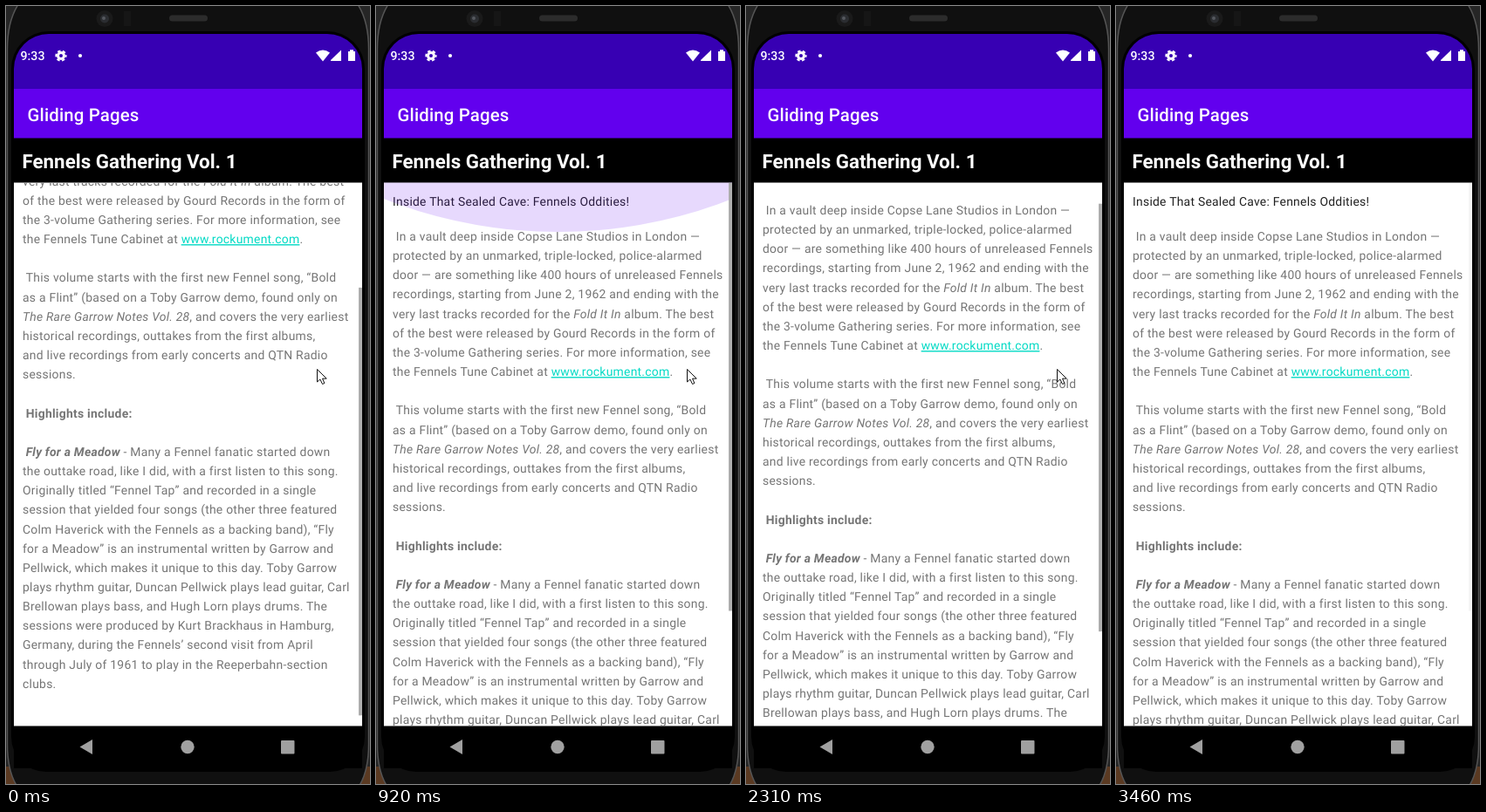
Recreate the animation shown at these times as an HTML page. Size 417 by 892 pixels, loop 4320 ms.

```html
<!DOCTYPE html>
<html lang="en">
<head>
<meta charset="utf-8">
<title>Gliding Pages</title>
<style>
  html, body { margin: 0; width: 100%; height: 100%; overflow: hidden; background: #262626; }
  svg { display: block; width: 417px; height: 892px; }
  text { font-family: Roboto, sans-serif; text-rendering: geometricPrecision; white-space: pre; }
  #page text { font-size: 13.92px; letter-spacing: .0179em; fill: #757575; }
  #page .lead { fill: #212121; }
  .i { font-style: italic; }
  .b { font-weight: 700; }
  .link { fill: #03dac5; text-decoration: underline; }
</style>
</head>
<body>
<svg viewBox="0 0 417 892">
  <defs>
    <clipPath id="screen"><path d="M9 874V72A40 40 0 0 1 49 32H368A40 40 0 0 1 408 72V874Z"/></clipPath>
    <clipPath id="view"><rect x="9" y="202.500" width="399" height="623"/></clipPath>
  </defs>

  <!-- phone body -->
  <rect width="417" height="892" fill="#262626"/>
  <path d="M0 872h14v20H0zM403 872h14v20h-14z" fill="#5b3a22"/>
  <path d="M1.500 50Q1.500 14 17 -6H400Q415.500 14 415.500 50V846Q415.500 880 402 898H15Q1.500 880 1.500 846Z" fill="#101010" stroke="#555" stroke-width="1.500"/>
  <path d="M6 72A43 43 0 0 1 49 29H368A43 43 0 0 1 411 72V838A40 40 0 0 1 371 878H46A40 40 0 0 1 6 838Z"/>
  <circle cx="113" cy="14.500" r="9.500" fill="#1a1a1a"/>
  <circle cx="113" cy="14.500" r="5" fill="#2b2d31"/>
  <circle cx="112" cy="14" r="2" fill="#55585e"/>
  <path d="M135 6h8v17h-8z" fill="#161616"/>
  <rect x="187" y="10.500" width="44" height="7" rx="3.500" fill="#2c2c2c"/>

  <!-- bars -->
  <g clip-path="url(#screen)">
    <rect x="9" y="32" width="399" height="842"/>
    <rect x="9" y="32" width="399" height="63.500" fill="#3700b3"/>
    <rect x="9" y="95" width="399" height="56.500" fill="#6200ee"/>
    <rect x="9" y="202.500" width="399" height="623" fill="#fff"/>
  </g>
  <g fill="#fff">
    <text x="16.500" y="62" font-size="14.200" font-weight="500">9:33</text>
    <circle cx="63" cy="57" r="3.500" fill="none" stroke="#fff" stroke-width="3"/>
    <circle cx="63" cy="57" r="5.600" fill="none" stroke="#fff" stroke-width="2" stroke-dasharray="3.400 2.464" stroke-dashoffset="1.700"/>
    <circle cx="85" cy="57" r="2.100"/>
    <path d="M363 63.500L355 53.500Q363 47.500 371 53.500Z"/>
    <path d="M372 63V62L384 50.500V63Z"/>
    <path d="M392 52h2v-1.800h4V52h2v11h-8z"/>
    <text x="24.500" y="132" font-size="20.400" font-weight="500" letter-spacing=".15">Gliding Pages</text>
    <text x="18.500" y="186" font-size="22.350" font-weight="700">Fennels Gathering Vol. 1</text>
  </g>
  <g fill="#a0a0a0">
    <path d="M84.500 849.500L99 841V858Z"/>
    <circle cx="208" cy="849.500" r="7.700"/>
    <rect x="315" y="842" width="15.500" height="15.500" rx="1"/>
  </g>

  <!-- scrolling view -->
  <g clip-path="url(#view)">
    <g id="page"></g>
    <ellipse id="glow" cx="208.500" rx="479" fill="#6200ee"/>
    <rect id="bar" x="404" width="4" height="490.500" fill="#adadad"/>
  </g>
  <path id="cursor" d="M0 0V14.500L3.400 11.500L6 17L8.400 16L6 10.700H10.700Z" fill="#fff" stroke="#111" stroke-width="1"/>
</svg>
<script>
const LOOP = 4320, TOP = 203, VIEW = 622, BAR = 490.5;
const $ = id => document.getElementById(id);
const span = (cls, s) => `<tspan class="${cls}">${s}</tspan>`;

// a leading space marks an indented line
const lines = [
  ' In a vault deep inside Copse Lane Studios in London —',
  'protected by an unmarked, triple-locked, police-alarmed',
  'door — are something like 400 hours of unreleased Fennels',
  'recordings, starting from June 2, 1962 and ending with the',
  `very last tracks recorded for the ${span('i', 'Fold It In')} album. The best`,
  'of the best were released by Gourd Records in the form of',
  'the 3-volume Gathering series. For more information, see',
  `the Fennels Tune Cabinet at ${span('link', 'www.rockument.com')}.`,
  '',
  ' This volume starts with the first new Fennel song, “Bold',
  'as a Flint” (based on a Toby Garrow demo, found only on',
  `${span('i', 'The Rare Garrow Notes Vol. 28')}, and covers the very earliest`,
  'historical recordings, outtakes from the first albums,',
  'and live recordings from early concerts and QTN Radio',
  'sessions.',
  '',
  ' ' + span('b', 'Highlights include:'),
  '',
  ` ${span('b i', 'Fly for a Meadow')} - Many a Fennel fanatic started down`,
  'the outtake road, like I did, with a first listen to this song.',
  'Originally titled “Fennel Tap” and recorded in a single',
  'session that yielded four songs (the other three featured',
  'Colm Haverick with the Fennels as a backing band), “Fly',
  'for a Meadow” is an instrumental written by Garrow and',
  'Pellwick, which makes it unique to this day. Toby Garrow',
  'plays rhythm guitar, Duncan Pellwick plays lead guitar, Carl',
  'Brellowan plays bass, and Hugh Lorn plays drums. The',
  'sessions were produced by Kurt Brackhaus in Hamburg,',
  'Germany, during the Fennels’ second visit from April',
  'through July of 1961 to play in the Reeperbahn-section',
  'clubs.'
];

const row = (s, y, cls = '') =>
  `<text class="${cls}" x="${s[0] === ' ' ? 22.7 : 19}" y="${y}">${s.trim()}</text>`;
$('page').innerHTML = row('Inside That Sealed Cave: Fennels Oddities!', 228.5, 'lead') +
  lines.map((s, i) => row(s, 269 + i * 22.16)).join('');

// stepped tracks: [start ms, value]
const scroll = [[0, 152], [150, 138], [550, 107], [800, 40], [920, 0],
  [2060, 15], [2310, 30], [2740, 45], [2860, 20], [2980, 0]];
const depth = [[0, 0], [920, 56], [1070, 47], [1220, 29], [1370, 22], [1490, 17], [2060, 0]];
const tint = [[0, .15], [1220, .12], [1370, .09], [1490, .07]];
const barFade = [[0, 1], [1640, .66], [1760, .33], [1910, 0], [2060, 1], [3340, .55], [3460, .12]];
const cursorX = [[0, 356.5], [3100, 405], [3220, 430]];

const at = (track, t) => track.filter(k => k[0] <= t).pop()[1];

function draw(t) {
  const y = at(scroll, t);
  $('page').setAttribute('transform', `translate(0 ${-y})`);
  $('bar').setAttribute('y', TOP + y * BAR / VIEW);
  $('bar').setAttribute('opacity', at(barFade, t));
  // a circle segment squashed towards the top edge
  const k = at(depth, t) / 64.2;
  $('glow').setAttribute('cy', TOP - 414.8 * k);
  $('glow').setAttribute('ry', 479 * k);
  $('glow').setAttribute('opacity', at(tint, t));
  $('cursor').setAttribute('transform', `translate(${at(cursorX, t)} 416.5)`);
}

const start = performance.now();
function tick(now) {
  draw(Math.max(0, now - start) % LOOP);
  requestAnimationFrame(tick);
}
draw(0);
requestAnimationFrame(tick);
</script>
</body>
</html>
```
